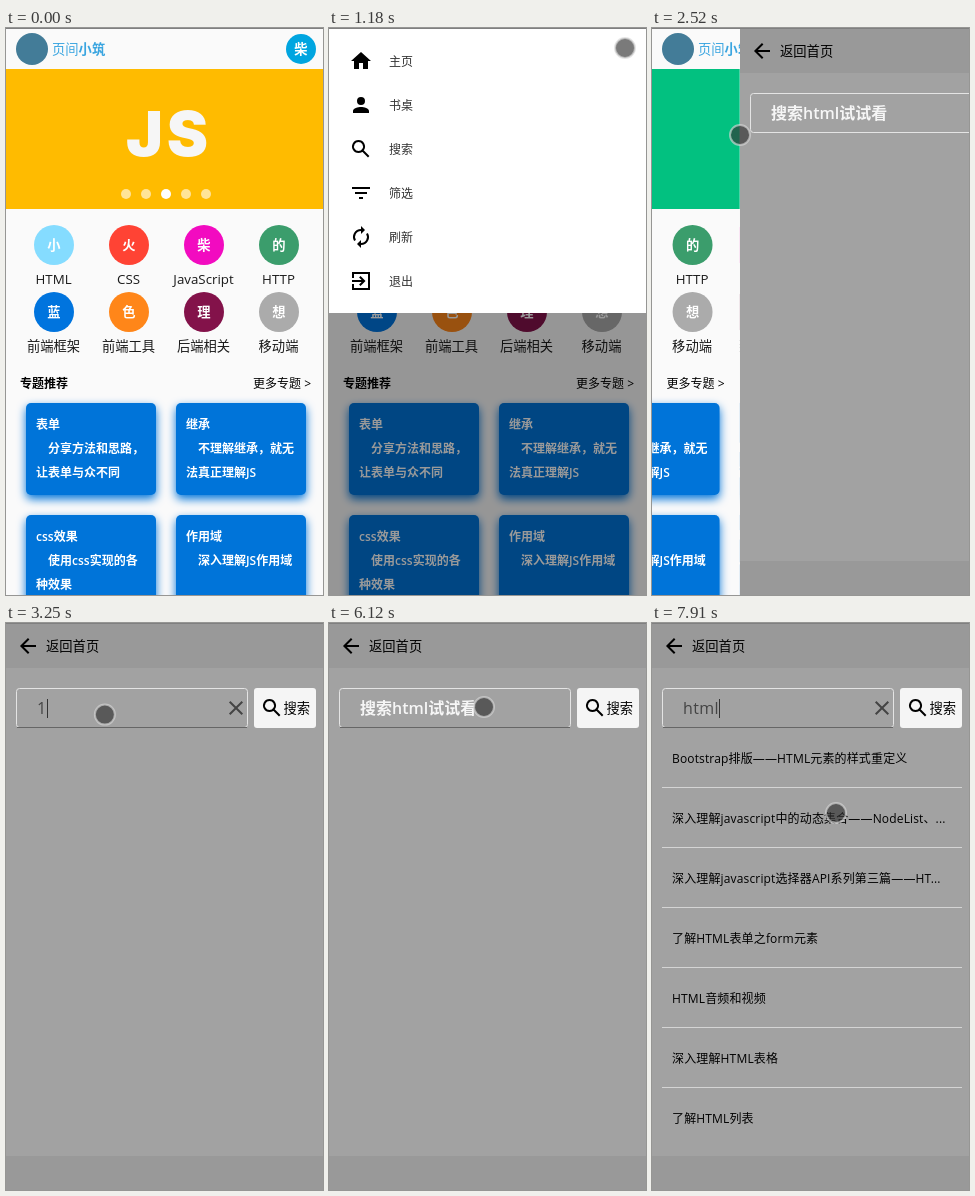
Animation, 317 px wide and 567 px high, one loop 8000 ms. Source, as an HTML page with a canvas:

```html
<!DOCTYPE html>
<html lang="zh">
<head>
<meta charset="utf-8">
<style>
html, body { margin: 0; width: 100%; height: 100%; overflow: hidden; background: #fafafa; }
canvas { display: block; width: 317px; height: 567px; }
</style>
</head>
<body>
<canvas></canvas>
<script>
const W = 320, LOOP = 8000, STEP = 132.5;
const canvas = document.querySelector('canvas');
const c = canvas.getContext('2d');
const dpr = window.devicePixelRatio || 1;
canvas.width = 317 * dpr;
canvas.height = 567 * dpr;

// Pointer stops: time, x, y
const stops = [[480, 264, 0], [927, 296, 20], [1450, 296, 20], [1855, 126, 99], [2120, 80, 118],
  [2260, 80, 118], [2517, 88, 107], [3250, 100, 90], [3975, 270, 88], [4505, 270, 88],
  [4770, 231, 84], [5167, 231, 84], [5432, 155, 84], [7552, 155, 84], [7817, 296, 274],
  [7950, 184, 190]];

// Each icon: stroked path, filled path
const icons = {
  home: ['', 'M10 20v-6h4v6h5v-8h3L12 3 2 12h3v8z'],
  person: ['', 'M12 12a4 4 0 1 0 0-8 4 4 0 0 0 0 8zm0 2c-3 0-8 1.3-8 4v2h16v-2c0-2.7-5-4-8-4z'],
  search: ['M9.5 4a5.5 5.5 0 1 0 .01 0zM14 14l5.7 5.7', ''],
  filter: ['M3 7h18M6 12h12M10 17h4', ''],
  renew: ['M12 5a7 7 0 0 0-6 10.6M12 19a7 7 0 0 0 6-10.6', 'M12 1v8l4-4zm0 22v-8l-4 4z'],
  exit: ['M4 9V4h16v16H4v-5M3 12h12M10.8 7.7l4.3 4.3-4.3 4.3', ''],
  back: ['M20 12H5M12.7 4.7L5.4 12l7.3 7.3', ''],
  close: ['M5.7 5.7l12.6 12.6M18.3 5.7L5.7 18.3', '']
};

const topics = [['小', 'HTML', '#85dcff'], ['火', 'CSS', '#ff4334'], ['柴', 'JavaScript', '#f20bc0'],
  ['的', 'HTTP', '#3b9d6c'], ['蓝', '前端框架', '#0074de'], ['色', '前端工具', '#ff8619'],
  ['理', '后端相关', '#83124a'], ['想', '移动端', '#ababab']];

const cards = [['表单', '分享方法和思路，', '让表单与众不同'], ['继承', '不理解继承，就无', '法真正理解JS'],
  ['css效果', '使用css实现的各', '种效果'], ['作用域', '深入理解JS作用域', '']];

const menu = { home: '主页', person: '书桌', search: '搜索', filter: '筛选', renew: '刷新', exit: '退出' };

const results = ['Bootstrap排版——HTML元素的样式重定义', '深入理解javascript中的动态集合——NodeList、...',
  '深入理解javascript选择器API系列第三篇——HT...', '了解HTML表单之form元素',
  'HTML音频和视频', '深入理解HTML表格', '了解HTML列表'];

const clamp = x => Math.min(1, Math.max(0, x));
const ease = (t, start, dur) => 1 - (1 - clamp((t - start) / dur)) ** 3;
const within = (t, a, b) => t >= a && t < b;
const typing = (s, t, start, gap) => s.slice(0, Math.max(0, Math.floor((t - start) / gap) + 1));

function rect(x, y, w, h, color, r = 0) {
  c.fillStyle = color;
  c.beginPath();
  c.roundRect(x, y, w, h, r);
  c.fill();
}

function disc(x, y, r, color) {
  c.fillStyle = color;
  c.beginPath();
  c.arc(x, y, r, 0, 7);
  c.fill();
}

// y is the vertical middle of the line
function text(s, x, y, { size = 12, color = '#000', weight = 400, align = 'left', gap = 0, family = 'Open Sans' } = {}) {
  c.font = `${weight} ${size}px "${family}", "Noto Sans CJK SC", "Noto Sans CJK", sans-serif`;
  c.fillStyle = color;
  c.textAlign = align;
  c.letterSpacing = gap + 'px';
  c.fillText(s, x, y + size * .37);
  return c.measureText(s).width;
}

function shifted(x, y, draw) {
  c.save();
  c.translate(x, y);
  draw();
  c.restore();
}

function icon(name, x, y, color = '#000') {
  const [line, solid] = icons[name];
  shifted(x, y, () => {
    c.lineWidth = 2;
    c.strokeStyle = c.fillStyle = color;
    c.stroke(new Path2D(line));
    c.fill(new Path2D(solid));
  });
}

function banner(t) {
  const p = ease(t, 60, 430);
  shifted(-W * p, 0, () => {
    rect(0, 41, W, 140, '#ffbb00');
    text('JS', 163, 105, { size: 62, color: '#f6f6f6', weight: 900, align: 'center', gap: 4, family: 'Inter' });
    rect(W, 41, W, 140, '#02c180');
    disc(W + 160, 99, 31, '#4bd29a');
    text('Vue.js', W + 158, 145, { size: 19, color: '#b0edd8', align: 'center', family: 'Lato' });
  });
  const active = p < .5 ? 2 : 3;
  for (let i = 0; i < 5; i++)
    disc(120 + 20 * i, 166, 5, i === active ? '#fff' : 'rgba(255,255,255,.6)');
}

function home(t) {
  rect(0, 0, W, 567, '#fafafa');
  banner(t);
  topics.forEach(([mark, label, color], i) => {
    const x = 48 + 75 * (i % 4), y = 217 + 67 * (i >> 2);
    disc(x, y, 20, color);
    text(mark, x, y, { size: 13.3, color: '#fff', weight: 600, align: 'center' });
    text(label, x - .5, y + 34, { size: 13.3, color: '#1a1a1a', align: 'center' });
  });
  text('专题推荐', 14, 355.6, { weight: 700 });
  text('更多专题 >', 305, 355.6, { align: 'right' });
  cards.forEach(([title, ...lines], i) => {
    const x = 20 + 150 * (i % 2), y = 375 + 112 * (i >> 1), style = { color: '#fff', weight: 600 };
    c.shadowColor = '#0074d9';
    c.shadowBlur = 10 * dpr;
    c.shadowOffsetY = 4 * dpr;
    rect(x, y, 130, 92, '#0074d9', 5);
    c.shadowColor = 'transparent';
    text(title, x + 10, y + 22, style);
    lines.forEach((s, n) => text(s, x + 22 - 12 * n, y + 46 + 24 * n, style));
  });
}

function header() {
  rect(0, 0, W, 41, '#fafafa');
  disc(26, 21, 16, '#437c98');
  text('页间', 46, 21.5, { size: 13.3, color: '#3aa5e0' });
  text('小筑', 72.6, 21.5, { size: 13.3, color: '#3aa5e0', weight: 700 });
  disc(295, 21, 15, '#00a5e0');
  text('柴', 295, 21, { size: 13.3, color: '#fff', weight: 600, align: 'center' });
}

function drawer(m) {
  rect(0, 0, W, 567, `rgba(0,0,0,${.4 * m})`);
  shifted(0, -285 * (1 - m), () => {
    rect(0, 0, W, 285, '#fff');
    Object.entries(menu).forEach(([name, label], i) => {
      icon(name, 20, 21 + 44 * i);
      text(label, 60, 33.8 + 44 * i, { color: '#333' });
    });
  });
}

function search(now) {
  const focus = within(now, 2940, 4300) || now >= 5600;
  const typed = now < 5170 ? typing('1234', now, 3250, 220) : typing('html', now, 6390, 95);

  rect(0, 0, W, 567, '#999');
  rect(0, 45, W, 488, '#a2a2a2');
  icon('back', 10, 11);
  text('返回首页', 40, 23.5, { size: 13.3 });

  c.lineWidth = 1;
  c.strokeStyle = '#e4e4e4';
  c.beginPath();
  c.roundRect(10.5, 65.5, 231, 39, 3);
  c.stroke();
  if (focus) rect(11, 104, 230, 1, '#666');

  let caret = 31;
  if (typed) {
    caret += text(typed, 31, 85, { size: 16, color: '#444', gap: .4 });
    icon('close', 218, 73, '#444');
  } else {
    text('搜索html试试看', 31, 85, { size: 16, color: '#f6f6f6', weight: 600 });
  }
  const blink = within(now, 6120, 6390) || within(now, 7250, 7670);
  if (focus && !blink) rect(Math.round(caret), 76, 1, 19, '#333');

  rect(248, 65, 62, 40, '#f5f5f5', 3);
  icon('search', 254, 73);
  text('搜索', 277.5, 85, { size: 13.3 });

  if (within(now, 4300, 5170)) text('抱歉，暂无搜索结果', 20, 122.5);
  if (now >= 7250) results.forEach((s, i) => {
    if (i) rect(10, 104 + 60 * i, 300, 1, '#d4d4d4');
    text(s, 20, 135.5 + 60 * i, { gap: .15 });
  });
}

function pointer(t, now) {
  const i = stops.findLastIndex(s => s[0] <= t);
  if (i < 0) return;
  const [t0, x0, y0] = stops[i], [t1, x1, y1] = stops[i + 1] || [LOOP, x0, y0];
  const k = (t - t0) / (t1 - t0), x = x0 + (x1 - x0) * k, y = y0 + (y1 - y0) * k;
  if (within(now, 2220, 2370) || within(now, 4030, 4710)) {
    disc(x, y, 9.5, 'rgba(75,75,75,.58)');
    return;
  }
  disc(x, y, 10, 'rgba(51,51,51,.65)');
  c.lineWidth = 2;
  c.strokeStyle = 'rgba(215,215,215,.65)';
  c.stroke();
}

function draw(now) {
  // Movement advances in steps, as in a screen recording.
  const t = Math.floor((now + 40) / STEP) * STEP;
  const slide = ease(t, 2293, 640);
  const open = ease(t, 950, 230) * (1 - ease(t, 2260, 220));
  c.setTransform(dpr, 0, 0, dpr, 0, 0);
  if (slide < 1) {
    shifted(-W * slide, 0, () => home(t));
    header();
    if (open > 0) drawer(open);
  }
  if (slide > 0) shifted(Math.round(W * (1 - slide)), 0, () => search(now));
  rect(0, 0, W, 1, '#808080');
  pointer(t, now);
}

const start = performance.now();
function frame() {
  draw((performance.now() - start) % LOOP);
  requestAnimationFrame(frame);
}
frame();
</script>
</body>
</html>
```
